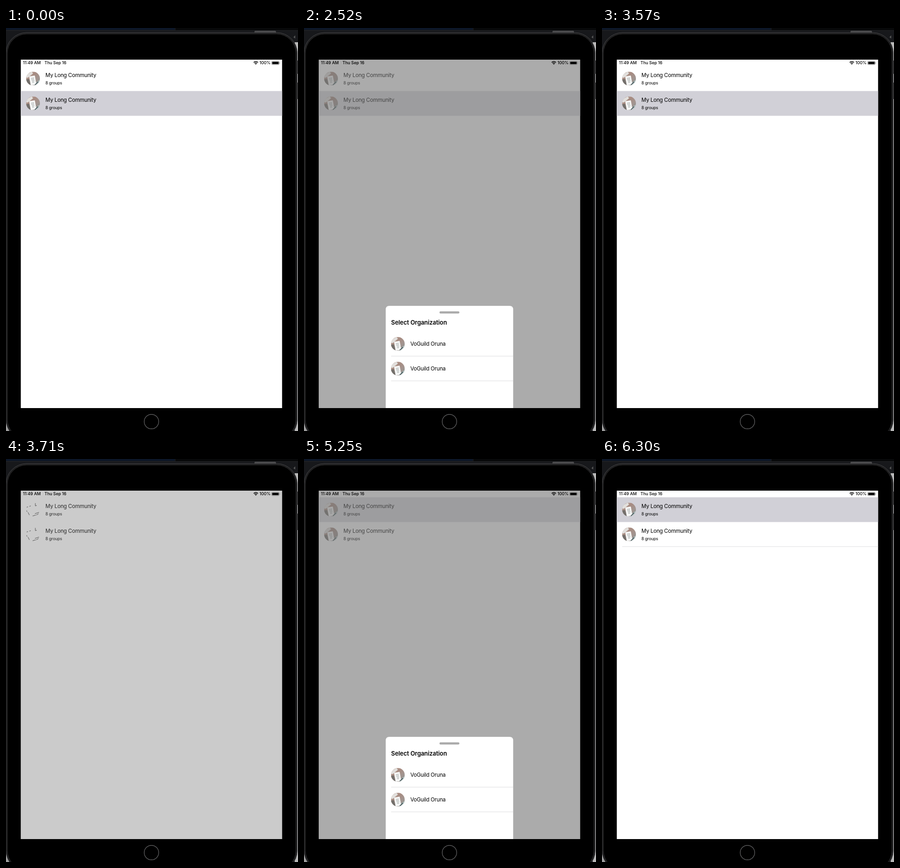
An HTML page that plays this animation: 637 px wide and 879 px high, repeating every 6.51 s.

```html
<!DOCTYPE html>
<html lang="en">
<head>
<meta charset="utf-8">
<title>Organization sheet</title>
<style>
  html, body { margin: 0; width: 100%; height: 100%; overflow: hidden; background: #000; }
  svg { display: block; width: 637px; height: 879px; }
  text { font-family: Inter, "Liberation Sans", sans-serif; fill: #000; }
  .name { font-size: 11.7px; letter-spacing: -.23px; }
  .sub { font-size: 9px; letter-spacing: -.18px; }
  .status { font-size: 9px; font-weight: 500; }
  .title { font-size: 13px; font-weight: 600; letter-spacing: -.07px; }
</style>
</head>
<body>
<svg viewBox="0 0 637 879">
  <defs>
    <clipPath id="screen"><rect x="32.3" y="69" width="570" height="760"/></clipPath>
    <clipPath id="round"><circle r="15"/></clipPath>
    <linearGradient id="desk" x1="0" y1="0" x2="1" y2="1">
      <stop offset="0" stop-color="#c4b5ae"/>
      <stop offset=".35" stop-color="#a88b80"/>
      <stop offset=".65" stop-color="#a39590"/>
      <stop offset="1" stop-color="#87918f"/>
    </linearGradient>
    <g id="avatar" clip-path="url(#round)">
      <rect x="-15" y="-15" width="30" height="30" fill="url(#desk)"/>
      <path d="M-15-8L-3-15L0-11L-11-2L-15-2Z" fill="#e2e0dd"/>
      <path d="M-15 2L-9 1L-4 15H-15Z" fill="#73706c"/>
      <path d="M6 9L15 3V15H3Z" fill="#b6c6c6"/>
      <g transform="rotate(-10)">
        <rect x="-7.5" y="-6" width="12.5" height="20" rx="1" fill="#f6f7f6"/>
        <path d="M-4-1H2M-4 2H2M-3 5H2M-3 8H1" stroke="#8e9594" stroke-width="1.3" stroke-dasharray="1.6 .5"/>
      </g>
      <path d="M4 14L11 7" stroke="#2b3d40" stroke-width="1.5"/>
    </g>
    <path id="traces" d="M-14-5L-11-6M-8-7L-5-8M5-14V-8L8-9M-14 2L-13 5M-11 6L-8 12M-1 14L6 12M4 9L13 6M7 12L12 9"
      fill="none" stroke="#3c3c3c" stroke-width="1"/>
  </defs>

  <!-- desktop behind the tablet -->
  <rect width="637" height="879" fill="#17181b"/>
  <rect width="368" height="4" fill="#0c1729"/>
  <rect x="370" width="267" height="6" fill="#08090a"/>
  <rect y="5" width="637" height="1" fill="#242528"/>
  <rect x="630" y="31" width="7" height="848" fill="#b9b9b9"/>
  <rect y="850" width="30" height="29" fill="#a0a0a0"/>
  <path d="M627 20L631 16V23Z" fill="#555"/>

  <!-- tablet -->
  <rect x="542" y="6" width="47" height="6" rx="2" fill="#4b4b4d"/>
  <path d="M636 71V100M636 119V155" stroke="#222" stroke-width="3"/>
  <rect x="0" y="10" width="635.5" height="889" rx="45" fill="#1b1b1c" stroke="#48484a"/>
  <rect x="3" y="13" width="629.5" height="883" rx="42" fill="#000" stroke="#303031"/>
  <circle cx="317.3" cy="858.5" r="15.8" fill="#000" stroke="#5c5c5d" stroke-width="1.4"/>

  <g clip-path="url(#screen)">
    <rect x="32" y="69" width="571" height="760" fill="#fff"/>
    <rect id="highlight" x="32" width="571" height="54" fill="#d1d0d7"/>
    <path id="divider" d="M44 191H603" stroke="#dedee0"/>
    <g id="rows"></g>
    <rect id="dim" x="32" y="69" width="571" height="760" fill="#737373"/>
    <g>
      <text class="status" x="37" y="79.4">11:49 AM</text>
      <text class="status" x="84" y="79.4">Thu Sep 16</text>
      <text class="status" x="553" y="79.4">100%</text>
      <g fill="none" stroke="#000" stroke-width="1.5">
        <path d="M540.3 75.1Q545 70.9 549.7 75.1M542.2 77.2Q545 74.8 547.8 77.2"/>
        <rect x="579.5" y="72.5" width="16.5" height="7.5" rx="2" stroke="#777" stroke-width=".8"/>
      </g>
      <path d="M543.5 78.4Q545 77.2 546.5 78.4L545 80Z"/>
      <rect x="580.7" y="73.7" width="14.1" height="5.1" rx="1"/>
      <path d="M597 75V77.5" stroke="#777"/>
    </g>
    <g id="sheet">
      <path d="M178.3 829V614Q178.3 606 186.3 606H448.3Q456.3 606 456.3 614V829Z" fill="#fff"/>
      <rect id="handle" x="295.5" y="618" width="43.5" height="4.8" rx="2.4"/>
      <text class="title" x="190" y="647">Select Organization</text>
      <g id="choices"></g>
    </g>
  </g>
</svg>
<script>
const LOOP = 6510, STEP = 70;
const SHEET_TRAVEL = 223, MAX_DIM = .6;
const OPEN_RATE = .018, CLOSE_RATE = .012;

// Each transition: first visible step, spring starts, settled time.
const transitions = [
  { from: 1330, sheet: 1365, dim: 1290, end: 1680, open: true },
  { from: 2520, sheet: 2520, dim: 2520, end: 3080, open: false },
  { from: 3570, sheet: 3710, dim: 3593, end: 4130, open: true },
  { from: 5250, sheet: 5306, dim: 5450, end: 5880, open: false }
];

const el = id => document.getElementById(id);
const [highlight, divider, dim, sheet, handle] =
  ['highlight', 'divider', 'dim', 'sheet', 'handle'].map(el);

const show = (node, on) => node.setAttribute('visibility', on ? 'visible' : 'hidden');

el('rows').innerHTML = [0, 54].map(y => `<g transform="translate(0 ${y})">
  <use class="photo" href="#avatar" x="59" y="110.3"/>
  <use class="trace" href="#traces" x="59" y="110.3"/>
  <text class="name" x="86" y="107">My Long Community</text>
  <text class="sub" x="86" y="123.2">8 groups</text></g>`).join('');

el('choices').innerHTML = [0, 54].map(y => `<g transform="translate(0 ${y})">
  <use href="#avatar" x="204.8" y="689"/>
  <text class="name" x="232" y="693.2">VoGuild Oruna</text>
  <path d="M190 715.7H456" stroke="#dcdcde"/></g>`).join('');

const photos = document.querySelectorAll('.photo');
const traces = document.querySelectorAll('.trace');

// Critically damped spring from 0 to 1.
function spring(ms, rate) {
  const x = Math.max(0, ms) * rate;
  return 1 - (1 + x) * Math.exp(-x);
}

function level(t, part) {
  const move = transitions.filter(m => t >= m.from).pop();
  if (!move) return 0;
  const rate = move.open ? OPEN_RATE : CLOSE_RATE;
  const done = t >= move.end ? 1 : spring(t - move[part], rate);
  return move.open ? done : 1 - done;
}

function render(time) {
  const t = Math.floor(time / STEP) * STEP;
  const raised = level(t, 'sheet'), shade = level(t, 'dim');
  const switching = t >= 3640 && t < 3780;

  sheet.setAttribute('transform', `translate(0 ${(1 - raised) * SHEET_TRAVEL})`);
  show(sheet, raised > 0);
  dim.setAttribute('opacity', shade * MAX_DIM);
  const grey = Math.round(198 - 27 * shade);
  handle.setAttribute('fill', `rgb(${grey},${grey},${grey})`);

  highlight.setAttribute('y', t < 3640 ? 137.5 : 83.5);
  highlight.setAttribute('opacity', 1 - .3 * shade);
  show(highlight, !switching);
  show(divider, t >= 5600);
  photos.forEach(p => show(p, !switching));
  traces.forEach(p => show(p, switching));
}

function tick() {
  render(performance.now() % LOOP);
  requestAnimationFrame(tick);
}
tick();
</script>
</body>
</html>
```
